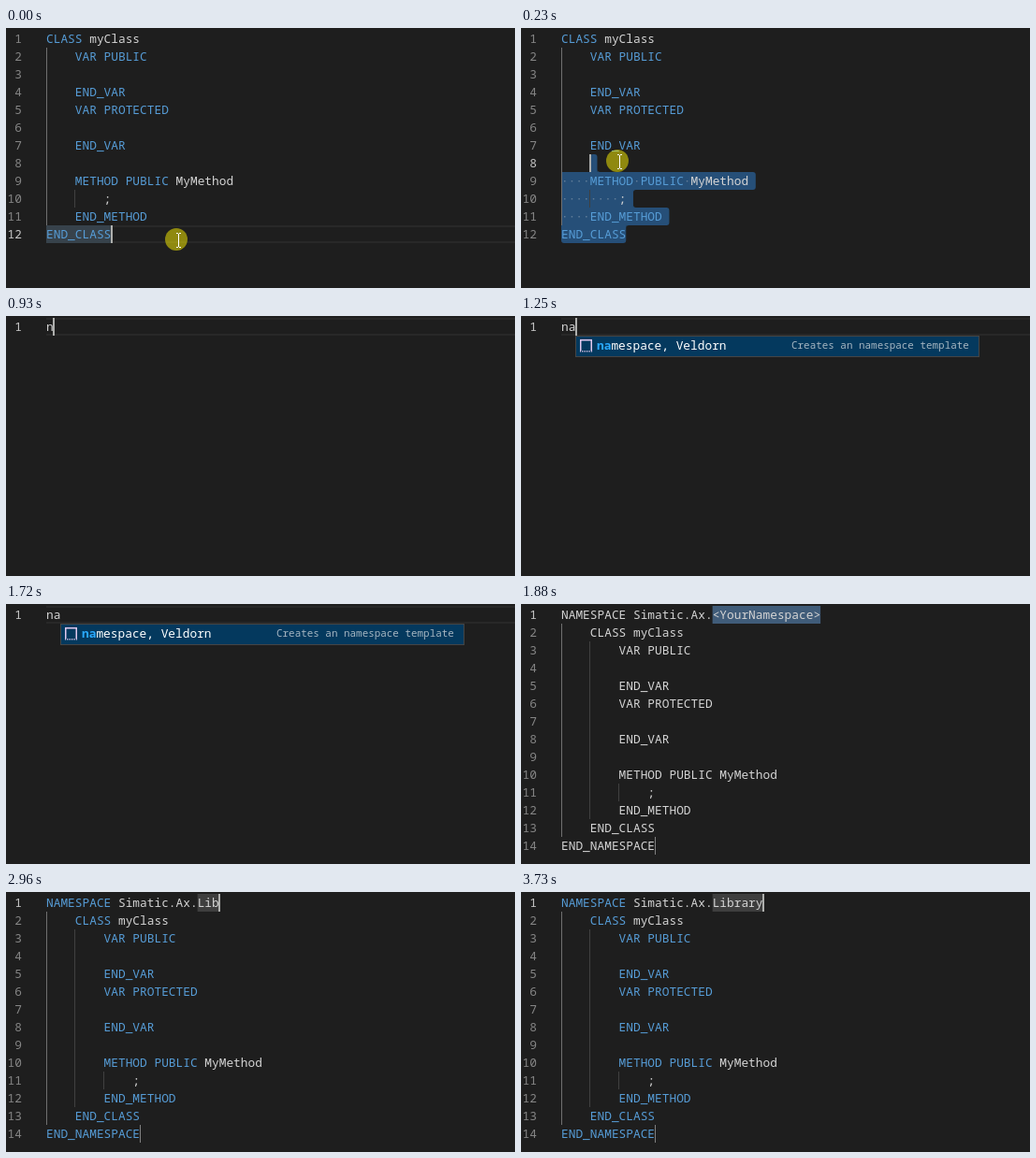
Write an HTML page with a canvas that moves like this. It is 544 px wide and 278 px high and loops after 4130 ms.

```html
<!DOCTYPE html>
<html lang="en">
<head>
<meta charset="utf-8">
<title>Namespace snippet</title>
<style>
html, body { margin: 0; width: 100%; height: 100%; overflow: hidden; background: #1e1e1e; }
canvas { display: block; width: 544px; height: 278px; }
</style>
</head>
<body>
<canvas id="stage" width="544" height="278"></canvas>
<script>
const ctx = document.getElementById('stage').getContext('2d');
const LOOP = 4130, LEFT = 43, TOP = 2, ROW = 19, CHAR = 7.697;
const FAMILY = '"Noto Sans Mono", "DejaVu Sans Mono", monospace';
const BG = '#1e1e1e', TEXT = '#d4d4d4', KEYWORD = '#569cd6', CARET = '#aeafad';
const IS_KEYWORD = /^(END_\w+|CLASS|VAR|PUBLIC|PROTECTED|METHOD|NAMESPACE)$/;

const CLASS_CODE = [
  'CLASS myClass',
  '    VAR PUBLIC',
  '        ',
  '    END_VAR',
  '    VAR PROTECTED',
  '        ',
  '    END_VAR',
  '    ',
  '    METHOD PUBLIC MyMethod',
  '        ;',
  '    END_METHOD',
  'END_CLASS'
];
const PREFIX = 'NAMESPACE Simatic.Ax.';
const PLACEHOLDER = '<YourNamespace>';
const WORD = 'Library';
const KEY_TIMES = [2480, 2710, 2960, 3200, 3500, 3580, 3730];

const colX = col => LEFT + col * CHAR;
const rowY = row => TOP + row * ROW;
const clamp = (v, lo, hi) => Math.max(lo, Math.min(hi, v));

function rect(x, y, w, h, color) {
  ctx.fillStyle = color;
  ctx.fillRect(x, y, w, h);
}

// Monospaced text on a fixed character grid.
function write(text, x, base, color, step = CHAR, weight = 400) {
  ctx.font = `${weight} ${step / 0.6}px ${FAMILY}`;
  ctx.fillStyle = color;
  [...text].forEach((c, i) => { if (c !== ' ') ctx.fillText(c, x + i * step, base); });
}

function codeLine(line, row, colored) {
  for (const m of line.matchAll(/\w+|[^\w\s]+/g)) {
    const color = colored && IS_KEYWORD.test(m[0]) ? KEYWORD : TEXT;
    write(m[0], colX(m.index), rowY(row) + 14, color);
  }
}

function lineNumbers(count, active) {
  for (let i = 0; i < count; i++) {
    const n = String(i + 1);
    write(n, 17 - n.length * CHAR, rowY(i) + 14, i === active ? '#c6c6c6' : '#858585');
  }
}

function code(lines, active, colored = true) {
  lineNumbers(lines.length, active);
  lines.forEach((line, i) => codeLine(line, i, colored));
}

function caret(col, row) {
  rect(Math.floor(colX(col)), rowY(row), 2, ROW, CARET);
}

function guide(col, from, to, color = '#404040') {
  rect(Math.floor(colX(col)), rowY(from), 1, (to - from) * ROW, color);
}

function currentLine(row) {
  rect(LEFT, rowY(row), 544 - LEFT, 2, '#282828');
  rect(LEFT, rowY(row) + ROW - 2, 544 - LEFT, 2, '#282828');
}

// Selection from a position to the end of the class code.
function selection(row, col) {
  const last = CLASS_CODE.length - 1;
  const edge = i => i < row || i > last ? 0 :
    colX(CLASS_CODE[i].length + (i < last ? 1 : 0));
  for (let i = row; i <= last; i++) {
    const x = i === row ? colX(col) : LEFT, y = rowY(i), right = edge(i);
    const up = edge(i - 1), down = edge(i + 1);
    ctx.fillStyle = '#264f78';
    ctx.beginPath();
    ctx.roundRect(x, y, Math.max(0, right - x), ROW,
      [i === row ? 3 : 0, up < right ? 3 : 0, down < right ? 3 : 0, i === last ? 3 : 0]);
    ctx.fill();
    if (up > right) notch(right, y, 3);
    if (down > right) notch(right, y + ROW, -3);
  }
  for (let i = row; i <= last; i++) {
    [...CLASS_CODE[i]].forEach((c, k) => {
      if (c === ' ' && (i > row || k >= col)) {
        rect(colX(k) + 3, rowY(i) + 9, 1.5, 1.5, 'rgba(227,228,226,.3)');
      }
    });
  }
}

function notch(x, y, r) {
  ctx.beginPath();
  ctx.moveTo(x, y);
  ctx.lineTo(x + 3, y);
  ctx.quadraticCurveTo(x, y, x, y + r);
  ctx.fill();
}

function pointer(x, y) {
  ctx.fillStyle = 'rgba(255,244,0,.5)';
  ctx.beginPath();
  ctx.arc(x, y, 12, 0, 7);
  ctx.fill();
  rect(x + 2, y - 6, 1, 14, '#fff');
  for (const end of [-7, 8]) {
    rect(x, y + end, 2, 1, '#fff');
    rect(x + 3, y + end, 2, 1, '#fff');
  }
}

function dragScene(t) {
  const p = t < 150 ? 0 : Math.min(5, 1 + Math.floor((t - 150) / 77.5)) / 5;
  const x = Math.round(182 - 198 * p), y = Math.round(226 - 210 * p);
  const row = clamp(Math.floor((y - TOP) / ROW), 0, 11);
  const col = clamp(Math.round((x - LEFT) / CHAR), 0, CLASS_CODE[row].length);
  if (p) {
    selection(row, col);
  } else {
    currentLine(11);
    rect(LEFT, rowY(11), 9 * CHAR, ROW, '#37424b');
  }
  guide(0, 1, 11, p === 1 ? '#4d6478' : '#707070');
  guide(4, 9, 10);
  code(CLASS_CODE, row);
  caret(col, row);
  pointer(x, y);
}

function snippetIcon(x, y) {
  const c = '#e2c9ee';
  rect(x, y, 13, 1.5, c);
  rect(x, y, 1.5, 12, c);
  rect(x + 11.5, y, 1.5, 12, c);
  for (let i = 0; i < 13; i += 2) rect(x + i, y + 12, 1, 1.5, c);
}

function suggestions(x, typed, items) {
  const h = items.length * ROW + 4;
  rect(x, 21, 432, h, '#454545');
  rect(x + 1, 22, 430, h - 2, '#252526');
  rect(x + 1, 22, 430, ROW + 2, '#04395e');
  items.forEach((label, i) => {
    const base = 36 + i * ROW, n = typed.length;
    snippetIcon(x + 5, base - 11);
    write(label.slice(0, n), x + 23, base, '#2aaaff', CHAR, 700);
    write(label.slice(n), x + 23 + n * CHAR, base, i ? TEXT : '#fff');
  });
  write('Creates an namespace template', x + 231, 35, '#a5b5c1', 6.545, 500);
}

function typeScene(t) {
  const typed = t < 1250 ? 'n' : 'na';
  currentLine(0);
  code([typed], 0);
  if (t < 1720) caret(typed.length, 0);
  if (t >= 1250) suggestions(58, typed, ['namespace, Veldorn']);
  else if (t >= 1020) suggestions(50, typed, ['namespace, Veldorn', 'not', 'null']);
}

function snippetScene(t) {
  const count = KEY_TIMES.filter(k => t >= k).length;
  const selected = t < 2180;
  const name = selected ? PLACEHOLDER : WORD.slice(0, count);
  const start = PREFIX.length;
  rect(colX(start), TOP, name.length * CHAR, ROW, selected ? '#405c79' : '#3e3e3e');
  guide(0, 1, 13, '#707070');
  guide(4, 2, 12);
  guide(8, 10, 11);
  const body = CLASS_CODE.map(line => '    ' + line);
  code([PREFIX + name, ...body, 'END_NAMESPACE'], 0, t >= 1950);
  rect(143, rowY(13), 1, ROW, '#808080');
  if (!selected) caret(start + count, 0);
}

function draw(now) {
  const t = now % LOOP;
  rect(0, 0, 544, 278, BG);
  if (t < 930) dragScene(t);
  else if (t < 1880) typeScene(t);
  else snippetScene(t);
}

const began = performance.now();
function tick() {
  draw(performance.now() - began);
  requestAnimationFrame(tick);
}
tick();
</script>
</body>
</html>
```
